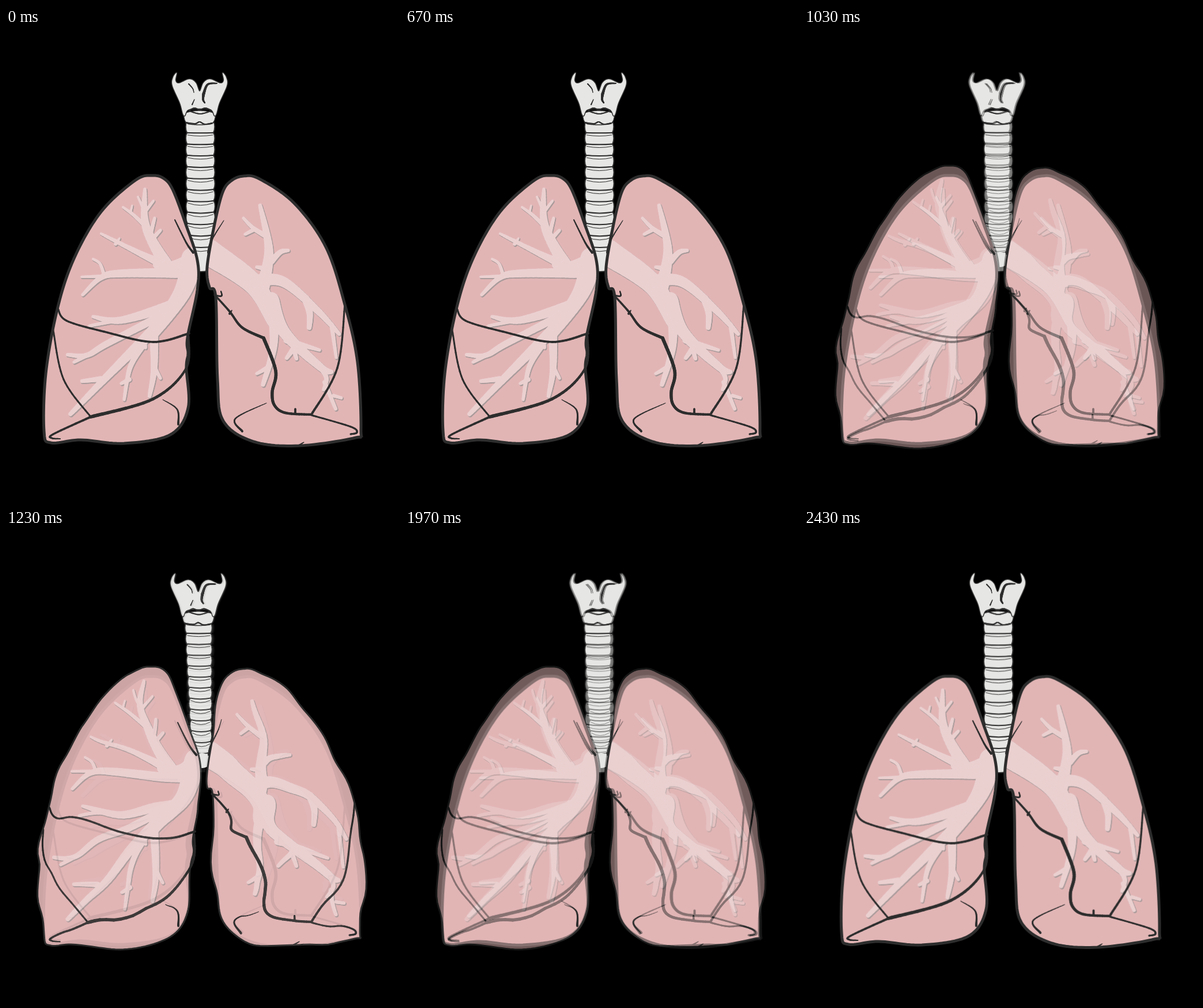
Write an HTML page with a canvas that moves like this. It is 682 px wide and 821 px high and loops after 2460 ms.

```html
<!DOCTYPE html>
<html lang="en">
<head>
<meta charset="utf-8">
<title>Breathing lungs</title>
<style>
html, body { margin: 0; width: 100%; height: 100%; overflow: hidden; background: #000; }
canvas { display: block; }
</style>
</head>
<body>
<canvas id="stage" width="682" height="821"></canvas>
<script>
const W = 682, H = 821, LOOP = 2460;
const INK = '#2d2d2d', PINK = '#e2b5b5', AIRWAY = '#ebd0d0', SHADE = '#aa9b9b', CARTILAGE = '#e6e6e4';

// Inhaling pulls the tissue around each pin: x, y, shift x, shift y.
const leftPins = [
  [255, 256, 0, -17], [195, 287, -4, -20], [135, 360, -11, -10], [90, 487, -15, -4],
  [69, 600, -12, 0], [69, 713, 0, 3], [147, 675, -5, 8], [255, 644, 5, 7],
  [301, 673, 0, 1], [317, 535, 10, -5], [332, 430, 4, 0], [306, 319, 5, 3],
  [203, 311, -14, -9], [250, 365, 5, 3], [165, 357, -18, 4], [290, 418, 8, 6],
  [133, 463, -18, -12], [150, 501, -18, -20], [235, 520, 0, -9], [107, 567, -24, 3], [205, 645, 1, 15]
];
const rightPins = [
  [412, 257, -2, -14], [470, 278, 5, -13], [530, 341, 10, 2], [588, 480, 17, -4],
  [610, 580, 13, 0], [613, 706, -2, 0], [510, 725, -8, -3], [370, 670, 0, 0],
  [364, 500, -5, -5], [447, 538, -30, -3], [468, 600, -18, 15], [530, 671, 0, 11],
  [441, 308, -14, -9], [455, 400, -12, 0], [490, 386, 3, 6], [430, 445, -5, 5],
  [446, 619, -14, 14], [526, 500, 8, -8], [573, 572, 12, 15], [544, 575, 15, 12], [351, 388, 1, 2]
];

const rest = { stretched: false, outline: 5, dx: 0, dy: 0, topX: 337, endX: 338, topW: 50, endW: 50, pitch: 19.7 };
const full = { stretched: true, outline: 3, dx: -2.5, dy: -0.5, topX: 334, endX: 340, topW: 47, endW: 34, pitch: 18.8 };

function stretch([x, y]) {
  let sum = 0, dx = 0, dy = 0;
  for (const [px, py, sx, sy] of x < 341 ? leftPins : rightPins) {
    const weight = ((x - px) ** 2 + (y - py) ** 2 + 150) ** -2;
    sum += weight;
    dx += sx * weight;
    dy += sy * weight;
  }
  return [x + dx / sum, y + dy / sum];
}

function pairs(values) {
  const points = [];
  for (let i = 0; i < values.length; i += 2) points.push([values[i], values[i + 1]]);
  return points;
}

// Catmull-Rom samples through the given points.
function spline(points, closed = false, steps = 12) {
  const n = points.length, spans = closed ? n : n - 1, out = [];
  const at = i => points[closed ? (i + n) % n : Math.max(0, Math.min(n - 1, i))];
  for (let i = 0; i < spans; i++) {
    const [a, b, c, d] = [at(i - 1), at(i), at(i + 1), at(i + 2)];
    for (let s = 0; s < steps; s++) {
      const u = s / steps;
      out.push([0, 1].map(k => b[k] + 0.5 * u * (c[k] - a[k] +
        u * (2 * a[k] - 5 * b[k] + 4 * c[k] - d[k] + u * (3 * (b[k] - c[k]) + d[k] - a[k])))));
    }
  }
  if (!closed) out.push(points[n - 1]);
  return out;
}

function blob(points, place = p => p) {
  const path = new Path2D();
  spline(points, true).forEach(p => path.lineTo(...place(p)));
  path.closePath();
  return path;
}

// Closed shape from its left half, mirrored about x = 336.
function mirrored(...half) {
  const left = pairs(half);
  return blob([...left, ...left.slice(1).reverse().map(([x, y]) => [672 - x, y])]);
}

function taper(ctx, from, to, coords, place = p => p) {
  const points = spline(pairs(coords)).map(place);
  ctx.lineCap = 'round';
  for (let i = 1; i < points.length; i++) {
    ctx.lineWidth = from + (to - from) * i / points.length;
    ctx.beginPath();
    ctx.moveTo(...points[i - 1]);
    ctx.lineTo(...points[i]);
    ctx.stroke();
  }
}

function leftLung(place) {
  return blob(pairs([
    255, 256, 275, 262, 290, 282, 311, 338, 332, 403, 332, 455, 315, 537, 316, 565, 313, 590, 316, 660,
    285, 706, 205, 721, 130, 715, 78, 720, 66, 700, 69, 600, 89, 488, 118, 400, 165, 319, 225, 264
  ]), place);
}

function rightLung(place) {
  return blob(pairs([
    412, 257, 440, 262, 500, 304, 555, 380, 588, 480, 610, 580, 616, 698, 607, 711, 510, 725,
    430, 718, 377, 682, 367, 610, 364, 468, 353, 450, 349, 415, 362, 340, 376, 285, 391, 265
  ]), place);
}

function leftAirways(branch) {
  branch(34, 20, 332, 403, 290, 418, 265, 410);
  branch(40, 18, 324, 400, 305, 460, 254, 532);
  branch(24, 5, 278, 412, 243, 345, 241, 280);
  branch(8, 4, 243, 345, 222, 325, 203, 311);
  branch(5, 4, 240, 318, 229, 293);
  branch(4, 3, 216, 320, 219, 308);
  branch(6, 4, 242, 318, 256, 300);
  branch(8, 5, 250, 360, 258, 330);
  branch(8, 5, 253, 367, 268, 351);
  branch(16, 4, 268, 408, 230, 390, 165, 357);
  branch(6, 3, 190, 375, 197, 365);
  branch(18, 5, 298, 425, 200, 426, 165, 433, 133, 463);
  branch(6, 4, 163, 431, 131, 432);
  branch(6, 4, 170, 428, 163, 409, 151, 401);
  branch(20, 5, 292, 480, 200, 507, 151, 501);
  branch(7, 5, 190, 508, 145, 517);
  branch(14, 6, 264, 502, 175, 548, 140, 568, 107, 567);
  branch(8, 5, 140, 568, 118, 580);
  branch(20, 7, 255, 525, 180, 600, 112, 670);
  branch(10, 6, 165, 609, 132, 613);
  branch(12, 5, 236, 552, 215, 590, 205, 645);
  branch(8, 5, 214, 610, 200, 617);
  branch(17, 6, 256, 520, 257, 590, 249, 639);
  branch(8, 5, 258, 590, 268, 608);
  branch(8, 5, 240, 538, 242, 555);
}

function rightAirways(branch) {
  branch(46, 24, 350, 388, 430, 445, 466, 510);
  branch(24, 6, 446, 448, 456, 385, 441, 308);
  branch(10, 5, 453, 362, 430, 348, 412, 330);
  branch(7, 5, 430, 350, 415, 358);
  branch(12, 5, 460, 405, 476, 389, 490, 386);
  branch(10, 5, 452, 418, 435, 415);
  branch(24, 6, 430, 440, 480, 440, 540, 490, 578, 531);
  branch(8, 5, 565, 515, 573, 572);
  branch(14, 8, 520, 470, 527, 495, 526, 520);
  branch(28, 6, 460, 472, 483, 528, 545, 588, 565, 597);
  branch(12, 5, 487, 542, 544, 559);
  branch(10, 6, 500, 555, 487, 573);
  branch(9, 6, 499, 555, 504, 574);
  branch(10, 5, 545, 587, 556, 608, 551, 628);
  branch(8, 6, 553, 615, 572, 661);
  branch(6, 5, 568, 638, 582, 642);
  branch(18, 7, 465, 510, 463, 560, 446, 619);
  branch(8, 5, 453, 590, 435, 600);
}

function folds(line) {
  line(3, 4, 90, 487, 105, 508, 170, 527, 255, 545, 318, 530);
  line(3, 3, 82, 525, 100, 610, 147, 675);
  line(6, 3, 147, 675, 255, 644, 312, 592, 317, 535);
  line(2, 4, 94, 713, 80, 712, 82, 705, 147, 675);
  line(1, 4, 272, 645, 297, 662, 299, 688);
  line(2, 4, 293, 333, 313, 373, 325, 390);

  line(3, 5, 362, 463, 388, 492, 410, 520, 447, 538);
  line(6, 4, 447, 538, 468, 595, 462, 632, 466, 655, 485, 668, 530, 671);
  line(4, 3, 530, 671, 575, 590, 588, 480);
  line(3, 3, 530, 672, 598, 692, 609, 702, 598, 705);
  line(1, 4, 452, 651, 398, 678, 410, 700);
  line(1, 4, 378, 334, 356, 370, 351, 390);
  line(3, 2, 362, 464, 374, 465, 373, 457);
  line(4, 1, 388, 496, 392, 490);
  line(1, 3, 517, 719, 507, 725);
  line(3, 3, 502, 661, 502, 668);
}

function drawTrachea(ctx, { topX, endX, topW, endW, pitch }) {
  ctx.fillStyle = CARTILAGE;
  ctx.strokeStyle = INK;
  for (let y = 162; y < 400; y += pitch) {
    const k = (y - 162) / 238;
    const x = topX + (endX - topX) * k, w = topW + (endW - topW) * k;
    const left = x - w / 2, right = x + w / 2, sag = 1 + 4 * k;
    const ring = new Path2D();
    ring.moveTo(left + 2, y);
    ring.quadraticCurveTo(x, y + sag, right - 2, y);
    ring.bezierCurveTo(right + 1, y + 5, right + 1, y + 14, right - 2, y + pitch);
    ring.quadraticCurveTo(x, y + pitch + sag * 2, left + 2, y + pitch);
    ring.bezierCurveTo(left - 1, y + 14, left - 1, y + 5, left + 2, y);
    ctx.fill(ring);
    ctx.lineWidth = 2;
    ctx.stroke(ring);
    ctx.beginPath();
    ctx.moveTo(left + 3, y + 4);
    ctx.quadraticCurveTo(x, y + 5 + sag * 2, right - 3, y + 4);
    ctx.lineWidth = 1;
    ctx.stroke();
  }
  ctx.beginPath();
  ctx.ellipse(endX, 402, 15, 13, 0, 0, 2 * Math.PI);
  ctx.fill();
}

function drawLarynx(ctx, { dx, dy }) {
  const cricoid = mirrored(336, 144, 312, 148, 310, 157, 315, 165, 328, 167);
  const thyroid = mirrored(336, 110, 329, 95, 318, 89, 300, 96, 294, 91, 296, 78, 290, 86, 289, 100, 302, 130, 309, 152, 318, 141);
  const mark = (from, to, ...coords) => taper(ctx, from, to, coords);
  ctx.save();
  ctx.translate(dx, dy);
  ctx.strokeStyle = INK;
  ctx.fillStyle = CARTILAGE;
  ctx.lineJoin = 'round';
  for (const part of [cricoid, thyroid]) {
    ctx.lineWidth = 3;
    ctx.stroke(part);
    ctx.fill(part);
  }
  mark(2, 5, 366, 96, 350, 98, 343, 114);
  mark(5, 2, 343, 114, 342, 124, 345, 130);
  mark(2, 1, 317, 97, 324, 105, 326, 112);
  mark(1, 2, 327, 124, 323, 133);
  mark(2, 2, 318, 143, 327, 139, 336, 142, 346, 139, 356, 143);
  mark(2, 2, 318, 144, 337, 149, 356, 144);
  mark(2, 2, 312, 164, 328, 166, 336, 163, 345, 167, 358, 165);
  ctx.restore();
}

function render(pose) {
  const layer = document.createElement('canvas');
  layer.width = W;
  layer.height = H;
  const ctx = layer.getContext('2d');
  ctx.fillRect(0, 0, W, H);
  drawTrachea(ctx, pose);
  drawLarynx(ctx, pose);

  const place = pose.stretched ? stretch : p => p;
  const brush = grow => (from, to, ...coords) => taper(ctx, from + grow, to + grow, coords, place);
  const sides = [[leftLung(place), leftAirways], [rightLung(place), rightAirways]];
  for (const [lung, airways] of sides) {
    ctx.fillStyle = PINK;
    ctx.fill(lung);
    ctx.save();
    ctx.clip(lung);
    ctx.translate(1.3, 1.5);
    ctx.strokeStyle = SHADE;
    airways(brush(0.8));
    ctx.translate(-1.3, -1.5);
    ctx.strokeStyle = AIRWAY;
    airways(brush(0));
    ctx.restore();
    ctx.strokeStyle = INK;
    ctx.lineWidth = pose.outline;
    ctx.stroke(lung);
  }
  folds(brush(0));
  return layer;
}

const ctx = document.getElementById('stage').getContext('2d');
const restLayer = render(rest), fullLayer = render(full);
const ramp = (t, from, to) => Math.max(0, Math.min(1, (t - from) / (to - from)));

function frame() {
  const t = performance.now() % LOOP;
  const zoom = t > 1500 ? 1.003 : 1;
  ctx.globalAlpha = 1;
  ctx.fillRect(0, 0, W, H);
  ctx.drawImage(restLayer, 341 * (1 - zoom), 400 * (1 - zoom), W * zoom, H * zoom);
  ctx.globalAlpha = ramp(t, 810, 1275) - ramp(t, 1740, 2200);
  ctx.drawImage(fullLayer, 0, 0);
  requestAnimationFrame(frame);
}
frame();
</script>
</body>
</html>
```
